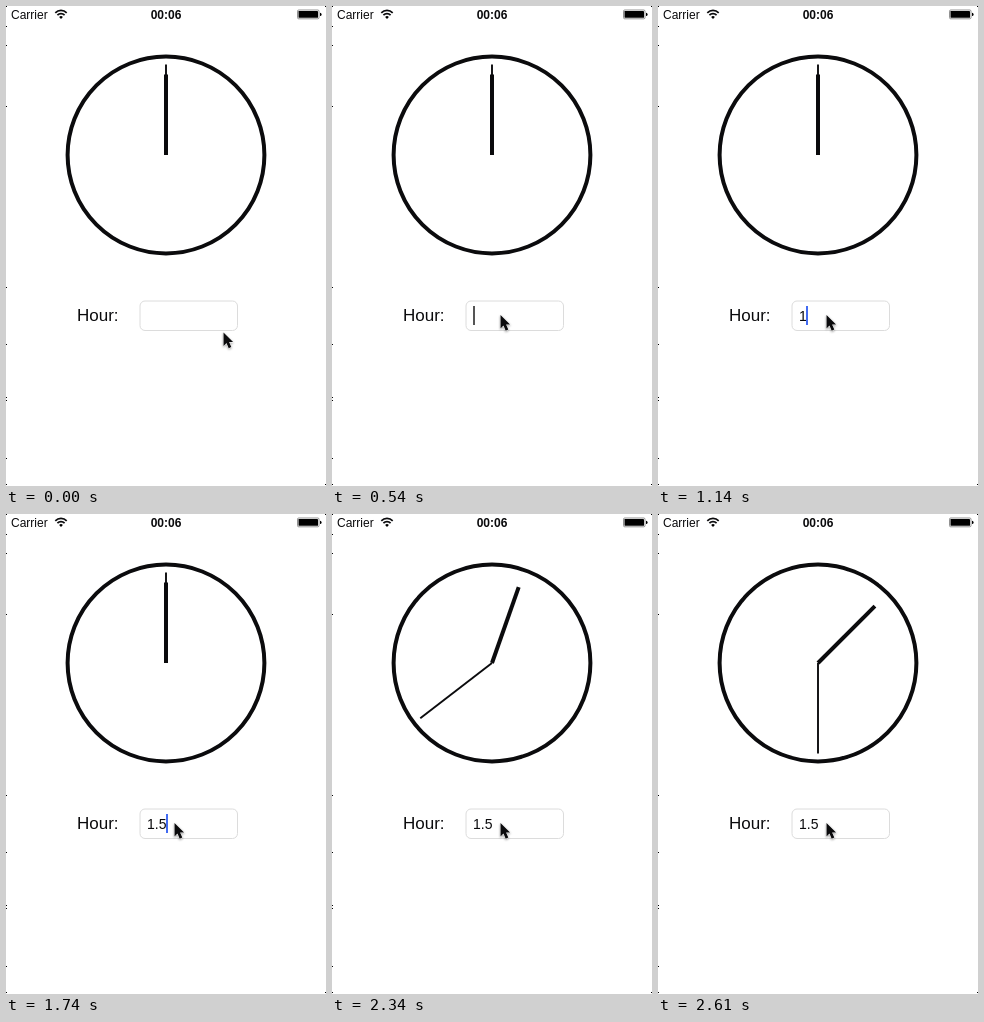
An HTML page that plays this animation: 320 by 480 pixels, repeating every 3.67 s.

```html
<!DOCTYPE html>
<html lang="en">
<head>
<meta charset="utf-8">
<title>Clock</title>
<style>
  html, body { margin: 0; width: 100%; height: 100%; overflow: hidden; background: #fff; }
  svg { display: block; width: 320px; height: 480px; }
  text { font-family: "Liberation Sans", Arial, sans-serif; fill: #0b0b0d; }
  .line { fill: none; stroke: #0b0b0d; }
  #pointer { filter: drop-shadow(0 1.5px 1px rgba(0, 0, 0, .35)); }
</style>
</head>
<body>
<svg viewBox="0 0 320 480">
  <!-- edge specks -->
  <path id="specks" fill="#000"/>

  <!-- status bar -->
  <text x="5" y="12.5" font-size="12">Carrier</text>
  <g class="line" stroke-width="1.7">
    <path d="M49.3 6.8A8 8 0 0 1 60.7 6.8"/>
    <path d="M51.4 9.1A5 5 0 0 1 58.6 9.1"/>
  </g>
  <path d="M55 13L53.1 11A2.7 2.7 0 0 1 56.9 11Z"/>
  <text x="160" y="12.5" font-size="12" font-weight="bold" text-anchor="middle">00:06</text>
  <rect x="291.5" y="4" width="21.5" height="8.8" rx="1.2" fill="none" stroke="#777" stroke-width=".8"/>
  <rect x="292.5" y="5" width="19.5" height="6.8" rx=".4"/>
  <path d="M314 6.8a1.6 1.6 0 0 1 0 3.2z"/>

  <!-- clock -->
  <circle class="line" cx="160" cy="149" r="98.4" stroke-width="4"/>
  <g transform="translate(160 149)">
    <path id="hour" class="line" d="M0 0V-80.5" stroke-width="4"/>
    <path id="minute" class="line" d="M0 0V-90.5" stroke-width="1.9"/>
  </g>

  <!-- input -->
  <text x="71" y="315" font-size="17">Hour:</text>
  <rect x="134" y="295" width="97.5" height="29.5" rx="5" fill="#fff" stroke="#dcdcdc"/>
  <text id="value" x="141" y="314.5" font-size="14"></text>
  <rect id="caret" y="300" width="2" height="19"/>

  <path id="pointer" d="M0 0V13.4L3 10.6L5.2 15.7L7.8 14.6L5.6 9.6H9.6Z"
        fill="#0b0b0d" stroke="#fff" stroke-width="1" paint-order="stroke"/>
</svg>
<script>
const LOOP = 3670, STEP = 30;
const $ = id => document.getElementById(id);

// [start time, text, caret x]
const typing = [
  [0, "", null], [540, "", 141], [1080, "1", 148],
  [1440, "1.", 152], [1680, "1.5", 160], [2250, "1.5", null]
];

const clamp = x => Math.min(1, Math.max(0, x));
const smooth = x => x * x * (3 - 2 * x);

// cubic-bezier(.25, .1, .25, 1), solved by bisection
function ease(x) {
  if (x <= 0 || x >= 1) return clamp(x);
  const curve = (u, a, b) => 3 * (1 - u) ** 2 * u * a + 3 * (1 - u) * u * u * b + u ** 3;
  let low = 0, high = 1;
  for (let i = 0; i < 24; i++) {
    const mid = (low + high) / 2;
    if (curve(mid, .25, .25) < x) low = mid; else high = mid;
  }
  return curve(low, .1, 1);
}

function draw(time) {
  const t = Math.floor(time / STEP) * STEP;

  const move = smooth(clamp(t / 360));
  $("pointer").setAttribute("transform", `translate(${217.5 - 49 * move} ${326.5 - 17.5 * move})`);

  const [, text, caretX] = typing.findLast(([start]) => t >= start);
  $("value").textContent = text;
  $("caret").setAttribute("visibility", caretX === null ? "hidden" : "visible");
  $("caret").setAttribute("x", caretX ?? 0);
  $("caret").setAttribute("fill", t < 570 ? "#555" : "#426bf2");

  const hours = 1.5 * (t >= 2610 ? 1 : ease((t - 2236) / 400));
  $("hour").setAttribute("transform", `rotate(${hours * 30})`);
  $("minute").setAttribute("transform", `rotate(${hours * 360})`);
}

$("specks").setAttribute("d",
  [20, 39, 100, 281, 338, 391, 394, 452].map(y => `M0 ${y}h1v1h-1z`).join("") +
  "M0 0h1v1h-1zM319 0h1v1h-1zM0 478h1v1h-1zM319 478h1v1h-1z");

const begin = performance.now();
function tick() {
  draw((performance.now() - begin) % LOOP);
  requestAnimationFrame(tick);
}
tick();
</script>
</body>
</html>
```
